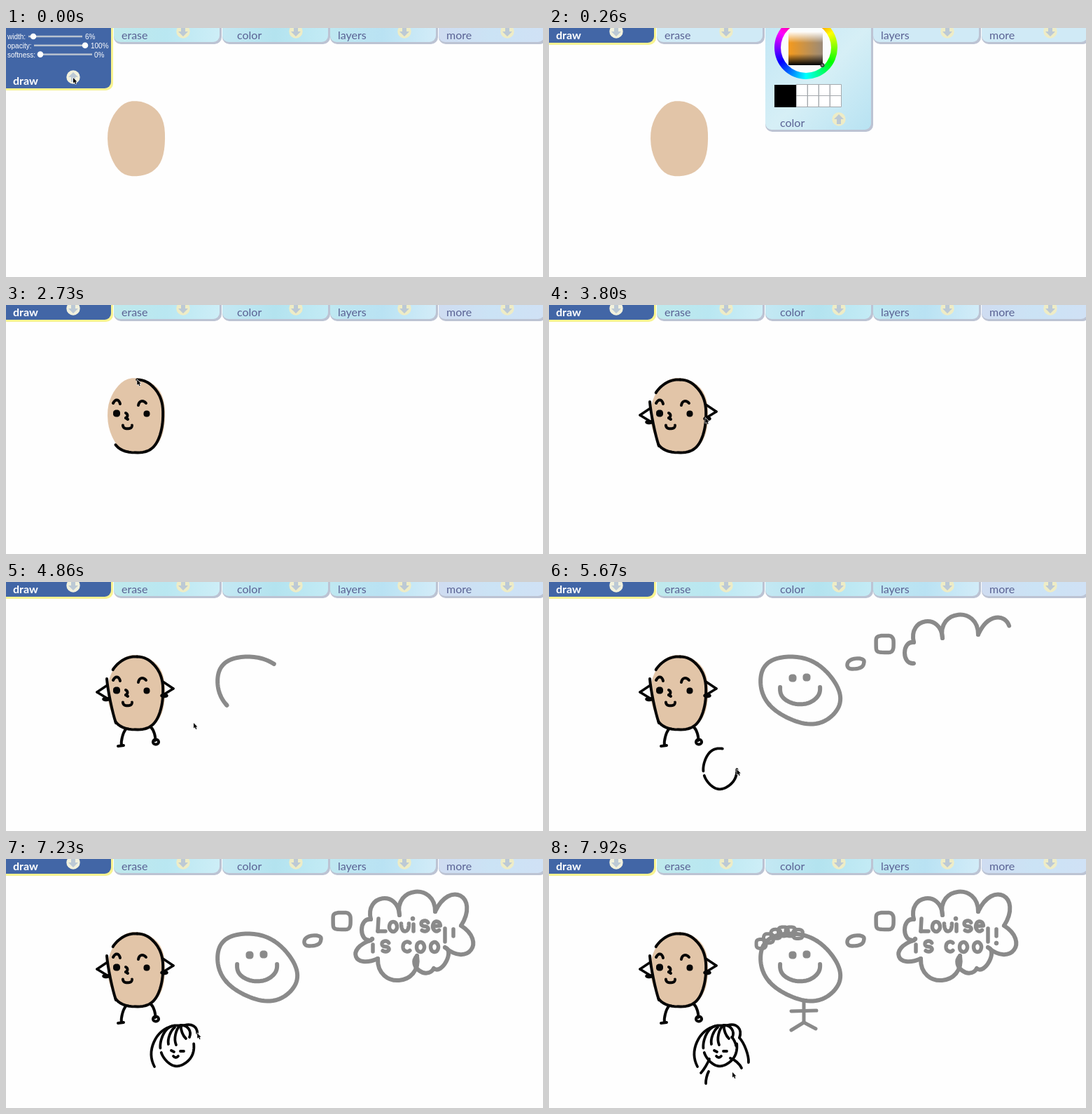
Animation, 767 px wide and 355 px high, one loop 8 s. Source, as an HTML page with a canvas:

```html
<!DOCTYPE html>
<html lang="en">
<head>
<meta charset="utf-8">
<title>Drawing together</title>
<style>
  html, body { margin: 0; width: 100%; height: 100%; overflow: hidden; background: #fefefe; }
  canvas { display: block; width: 100vw; height: 100vh; }
</style>
</head>
<body>
<canvas id="stage" width="767" height="355"></canvas>
<script>
const LOOP = 8000;
const INK = '#060606', GREY = '#8a8a8a', SKIN = '#e2c5a8';
const RAD = Math.PI / 180;
const ctx = document.getElementById('stage').getContext('2d');
const strokes = [];
const trail = [];

const clamp = v => Math.max(0, Math.min(1, v));
const progress = (t, a, b) => clamp((t - a) / (b - a));
const ease = v => v * v * (3 - 2 * v);

// Slightly unsteady oval or arc; "square" fills the corners, "lean" tilts it.
function oval(x, y, rx, ry, { from = -90, sweep = 360, square = 2, lean = 0 } = {}) {
  const bend = v => Math.sign(v) * Math.abs(v) ** (2 / square);
  const points = Array.from({ length: 49 }, (_, i) => {
    const a = (from + sweep * i / 48) * RAD;
    const r = 1 + .012 * Math.sin(5 * a + x);
    return [x + rx * r * bend(Math.cos(a - lean * RAD)), y + ry * r * bend(Math.sin(a))];
  });
  return 'M' + points.join('L');
}

// Line from one point to another that bulges to its left by "height".
function bow(x1, y1, x2, y2, height = 0, spread = .25) {
  const dx = x2 - x1, dy = y2 - y1, k = height * 4 / 3 / Math.hypot(dx, dy);
  const nx = dy * k, ny = -dx * k;
  return `M${x1},${y1}C${x1 + dx * spread + nx},${y1 + dy * spread + ny} ` +
    `${x2 - dx * spread + nx},${y2 - dy * spread + ny} ${x2},${y2}`;
}

const dot = (x, y, size = 1.5) => oval(x, y, size, size, { square: 4 });
const smile = (x, y, rx, ry) => oval(x, y, rx, ry, { from: 180, sweep: -180, square: 2.3 });

// Handwriting: each letter is built on its left edge x and baseline y.
const letters = {
  L: (x, y) => [bow(x + 2, y - 18, x + 1, y), bow(x + 1, y, x + 12, y)],
  o: (x, y) => [oval(x + 6, y - 6.5, 5.5, 7)],
  c: (x, y) => [oval(x + 7, y - 7, 6, 7, { from: -50, sweep: -260 })],
  u: (x, y) => [smile(x + 6, y - 11, 5.5, 11)],
  i: (x, y) => [bow(x + 1, y - 10, x + 1, y), dot(x, y - 18, .5)],
  s: (x, y) => [oval(x + 6, y - 11, 5, 4, { from: -20, sweep: -250 }) +
    oval(x + 6, y - 3.5, 5, 3.5, { sweep: 230 }).replace('M', 'L')],
  e: (x, y) => [bow(x + 2, y - 7, x + 11, y - 8), oval(x + 6, y - 7, 5.5, 7, { from: -10, sweep: -300 })],
  l: (x, y) => [bow(x + 1, y - 33, x + 1, y - 14)],
  '!': (x, y) => [bow(x, y - 32, x, y - 22), dot(x, y - 12, .5)],
};

function write(text, x, y, pitch) {
  return [...text].flatMap(ch => {
    const marks = letters[ch] ? letters[ch](x, y) : [];
    x += pitch * ('il!'.includes(ch) ? .65 : ch === ' ' ? .5 : 1);
    return marks;
  });
}

function measure(d) {
  const box = document.createElement('div');
  box.innerHTML = `<svg><path d="${d}"/></svg>`;
  return box.querySelector('path');
}

// Draws the paths one after another between start and end, at an even pace.
function sketch(start, end, color, width, ...paths) {
  const parts = paths.flat().map(d => {
    const probe = measure(d);
    return { path: new Path2D(d), probe, len: probe.getTotalLength(), color, width };
  });
  const lift = 6;
  const pace = (end - start) / parts.reduce((sum, s) => sum + s.len + lift, 0);
  let time = start;
  for (const s of parts) {
    s.from = time;
    s.to = time + s.len * pace;
    time = s.to + lift * pace;
    strokes.push(s);
    if (color === INK) trail.push(s);
  }
}

function hover(from, to, x, y) {
  trail.push({ from, to, x, y });
}

// Potato figure
const head = new Path2D(oval(186.5, 158, 41, 53.5, { square: 2.2 }));
const outline = (from, sweep) => oval(185, 159, 39, 52, { from, sweep, square: 2.35 });
const arm = (x, y, side) => [
  bow(x, y, x + 15 * side, y + 10), bow(x + 15 * side, y + 10, x + 2 * side, y + 18),
  oval(x + 2 * side, y + 20, 4, 1.5),
];

hover(0, 70, 96, 71);
hover(130, 330, 367, -30);
hover(400, 450, 414, 130);
sketch(680, 880, INK, 6, dot(158, 154.5, 2));
sketch(930, 1060, INK, 6, dot(201, 155));
sketch(1120, 1290, INK, 4, bow(171, 154, 171, 161, 2.5), bow(171, 161, 174, 163));
sketch(1335, 1600, INK, 4, smile(173.5, 171.5, 6.5, 4.8));
sketch(1750, 2120, INK, 4, bow(153, 140, 163, 141, 5), bow(189, 143, 200, 140, 4.5));
sketch(2220, 2730, INK, 4, outline(133, -221));
sketch(2740, 2930, INK, 4, outline(-88, -55));
sketch(2980, 3230, INK, 4, bow(144, 138, 157, 201, -1.5));
sketch(3300, 3560, INK, 3.5, arm(145, 147, -1));
sketch(3600, 3830, INK, 3.5, arm(224, 142, 1));
sketch(3880, 4200, INK, 4, bow(171, 210, 165, 233, -2), bow(160, 234, 168, 233),
  bow(207, 207, 213, 226, 2), oval(214, 228, 4, 3.5));
hover(4780, 4880, 268, 201);

// Small figure with long hair
const face = (from, sweep) => oval(244.5, 266, 24, 29, { from, sweep });
sketch(5000, 6440, INK, 3.8, face(-82, -105), face(-200, -165),
  bow(241, 240, 232, 264, -3), bow(249, 237, 243, 265, -4),
  bow(236, 273, 240, 275), bow(249, 274, 254, 274), bow(239, 281, 246, 281, -2), bow(250, 237, 262, 254, 6));
sketch(6520, 7650, INK, 3.8, bow(238, 238, 212, 296, -15), bow(250, 238, 257, 256, -2),
  bow(255, 237, 272, 255, 9), bow(272, 255, 285, 290, 3), bow(261, 254, 267, 266, 1));
sketch(7660, 7860, INK, 3.8, bow(229, 285, 217, 305, 1), bow(259, 284, 275, 298, 2), bow(228, 303, 224, 320, -1));
hover(7900, LOOP, 262, 304);

// Smiley
const ring = (from, sweep) => oval(358.5, 154, 57, 48, { from, sweep, lean: 15 });
sketch(4500, 4860, GREY, 6, ring(-50, -156));
sketch(4860, 5150, GREY, 6, ring(-206, -204));
sketch(5150, 5360, GREY, 6, dot(348, 137, 2.5), dot(368, 136, 2.5), smile(358.5, 150, 28.5, 24));
sketch(5370, 5500, GREY, 5.5, oval(438, 116.5, 12, 7.5, { square: 2.4, lean: -15 }), oval(479.5, 88.5, 12.5, 12, { square: 4 }));

// Thought cloud: corner points, each with the height of the puff that follows
const puffs = [[521, 116, 13], [521, 86, 27], [562, 80, 31], [613, 75, 37], [650, 95, 32],
  [627, 126, 11], [611, 156, 15], [587, 138, 33], [531, 142, 28]];
sketch(5510, 5900, GREY, 6, puffs.map(([x, y, height], i) => {
  const [nextX, nextY] = puffs[(i + 1) % puffs.length];
  return bow(x, y, nextX, nextY, height, -.08);
}));
sketch(5960, 6440, GREY, 5.5, write('Lou', 530, 103, 17));
sketch(6480, 6790, GREY, 5.5, write('ise', 581, 103, 17));
sketch(6820, 7250, GREY, 5.5, write('is cool!', 523, 132, 20));

// Curls and body
const curls = Array.from({ length: 6 }, (_, i) =>
  oval(303 + i * 10.5, 121 - 18 * Math.sin(i * .45), 7, 6.5, { square: 3 }));
sketch(7270, 7600, GREY, 5, curls);
sketch(7630, 7880, GREY, 5, bow(364, 203, 364, 233), bow(346, 217, 382, 216),
  bow(364, 233, 346, 244), bow(364, 233, 381, 242));

function drawStrokes(t) {
  ctx.lineCap = ctx.lineJoin = 'round';
  for (const s of strokes) {
    if (t < s.from) continue;
    const p = progress(t, s.from, s.to);
    ctx.setLineDash(p < 1 ? [Math.max(.1, s.len * p), 9999] : []);
    ctx.strokeStyle = s.color;
    ctx.lineWidth = s.width;
    ctx.stroke(s.path);
  }
  ctx.setLineDash([]);
}

function label(text, x, y, color, font) {
  ctx.font = font;
  ctx.fillStyle = color;
  ctx.fillText(text, x, y);
}

function disc(x, y, r, color) {
  ctx.fillStyle = color;
  ctx.beginPath();
  ctx.arc(x, y, r, 0, 7);
  ctx.fill();
}

function arrowIcon(x, y, up, tint) {
  disc(x, y, 9.7, tint);
  ctx.save();
  ctx.translate(x, y);
  if (up) ctx.scale(1, -1);
  ctx.fillStyle = '#bcc9d5';
  ctx.fill(new Path2D('M-3-7H3V0H7L0 7L-7 0H-3Z'));
  ctx.restore();
}

function panel(x, width, bottom, fill, edge) {
  ctx.beginPath();
  ctx.roundRect(x, -40, width + 1, bottom + 41, 10);
  ctx.fillStyle = edge;
  ctx.fill();
  ctx.beginPath();
  ctx.roundRect(x, -40, width - 2, bottom + 38, 9);
  ctx.fillStyle = fill;
  ctx.fill();
}

function gradient(x1, y1, x2, y2, ...colors) {
  const g = ctx.createLinearGradient(x1, y1, x2, y2);
  colors.forEach((c, i) => g.addColorStop(i / (colors.length - 1), c));
  return g;
}

function tab(name, x, textX, iconX, drop, fill) {
  panel(x, 153, 22 + drop, fill, '#bcc3d3');
  if (drop > 0) colorControls(drop - 125);
  label(name, textX, 16 + drop, '#5a6294', '16px Lato, sans-serif');
  arrowIcon(iconX, 5 + drop, drop > 60, '#eeecc6');
}

function colorControls(dy) {
  ctx.save();
  ctx.translate(0, dy);
  const wheel = ctx.createConicGradient(-Math.PI / 2, 367, 28);
  for (let i = 0; i <= 12; i++) wheel.addColorStop(i / 12, `hsl(${i * 30} 100% 50%)`);
  disc(367, 28, 45, wheel);
  disc(367, 28, 36, '#fafcfc');
  ctx.fillStyle = gradient(342, 0, 391, 0, '#f59a1c', '#9a8a78');
  ctx.fillRect(342, 5, 49, 48);
  ctx.fillStyle = gradient(0, 5, 0, 53, '#fff', '#fff0', '#0000', '#000');
  ctx.fillRect(342, 5, 49, 48);
  disc(390.5, 53, 3, '#333');
  disc(390.5, 53, 1.5, '#888');
  ctx.fillStyle = '#fff';
  ctx.fillRect(322, 81, 96, 32);
  ctx.strokeStyle = '#a4a9ad';
  ctx.lineWidth = 1;
  for (let i = 0; i < 8; i++) ctx.strokeRect(353.5 + i % 4 * 16, 80.5 + (i > 3) * 16, 16, 16);
  ctx.fillStyle = '#000';
  ctx.fillRect(322, 81, 31, 32);
  ctx.restore();
}

function drawPanel(drop) {
  panel(-8, 160, 23 + drop, '#4266a6', '#f8f390');
  const sliders = [['width:', 32, 39, '6%', 113], ['opacity:', 40, 113, '100%', 121], ['softness:', 46, 49, '0%', 126]];
  const small = '10px "Liberation Sans", sans-serif';
  sliders.forEach(([name, x, knob, value, valueX], i) => {
    const y = 12 + i * 12.8 + drop - 65;
    label(name, 2, y + 4, '#fff', small);
    label(value, valueX, y + 4, '#fff', small);
    ctx.fillStyle = '#b9c2cf';
    ctx.fillRect(x, y - 1.2, 77, 2.5);
    disc(knob, y, 4.3, '#fff');
  });
  label('draw', 10, 16 + drop, '#fff', 'bold 16px Lato, sans-serif');
  arrowIcon(96, 5 + drop, drop > 32, '#f2f1dd');
}

function drawToolbar(t) {
  const drawDrop = 65 * (1 - ease(progress(t, 65, 150)));
  const colorDrop = 125 * ease(progress(t, 120, 220)) * (1 - ease(progress(t, 430, 540)));
  const pale = t > 120 && t < 880;
  const tint = (x, ...colors) => pale ? '#d0eaf6' : gradient(x, 0, x + 150, 12, ...colors);
  tab('erase', 154, 165, 253, 0, tint(154, '#bfe9ec', '#b9e7f1', '#cdeef7'));
  tab('layers', 463, 474, 569, 0, tint(463, '#bfe8f1', '#b9e2f3', '#d2ecf8'));
  tab('more', 618, 629, 716, 0, tint(618, '#cfdcf1', '#cbe3f5', '#d0e1f5'));
  const colorFill = colorDrop
    ? gradient(309, 0, 462, 20 + colorDrop, '#c3e7f5', '#d6eff6', '#b7e2f2')
    : tint(309, '#c4e8f3', '#b3e3ef', '#c3ebf5');
  tab('color', 309, 330, 414, colorDrop, colorFill);
  drawPanel(drawDrop);
}

function spot(s, p) {
  return s.probe ? s.probe.getPointAtLength(s.len * p) : s;
}

function drawCursor(t) {
  const i = trail.findLastIndex(s => s.from <= t);
  const now = trail[i], next = trail[i + 1];
  let { x, y } = spot(now, progress(t, now.from, now.to));
  if (next && t > now.to) {
    const goal = spot(next, 0), p = ease(progress(t, now.to, next.from));
    x += (goal.x - x) * p;
    y += (goal.y - y) * p;
  }
  const arrow = new Path2D('M0 0V7.5L1.8 6L3.2 9L4.4 8.4L3.2 5.5H5.4Z');
  ctx.save();
  ctx.translate(x, y);
  ctx.strokeStyle = '#fff';
  ctx.lineWidth = 1.2;
  ctx.stroke(arrow);
  ctx.fillStyle = '#000';
  ctx.fill(arrow);
  ctx.restore();
}

function render(t) {
  ctx.fillStyle = '#fefefe';
  ctx.fillRect(0, 0, 767, 355);
  ctx.fillStyle = SKIN;
  ctx.fill(head);
  drawStrokes(t);
  drawToolbar(t);
  drawCursor(t);
}

const began = performance.now();
function tick() {
  render((performance.now() - began) % LOOP);
  requestAnimationFrame(tick);
}
tick();
</script>
</body>
</html>
```
